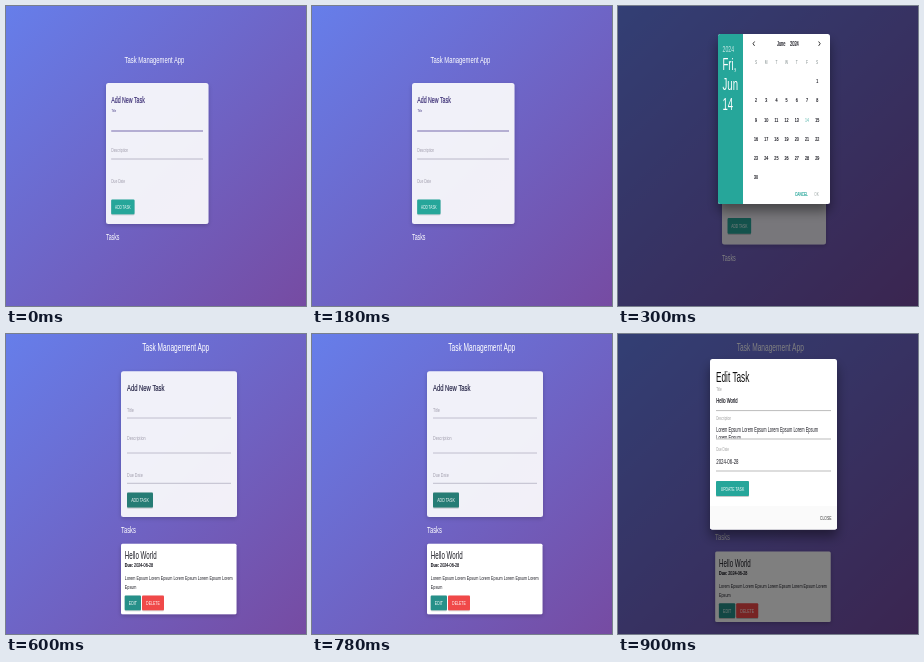
An HTML page that plays this animation: 300x300 px, repeating every 1.2 s.

```html
<!DOCTYPE html>
<html lang="en">
<head>
<meta charset="utf-8">
<title>Task Management App</title>
<style>
  html, body { margin: 0; width: 100%; height: 100%; overflow: hidden; background: #6e65c6; }
  svg { display: block; width: 100%; height: 100%; }
  text { font-family: "Liberation Sans", Arial, sans-serif; white-space: pre; }
</style>
</head>
<body>
<svg id="stage" viewBox="0 0 300 300" preserveAspectRatio="none">
  <defs>
    <linearGradient id="sky" x1="0" y1="0" x2="1" y2="1">
      <stop offset="0" stop-color="#667eea"/>
      <stop offset="1" stop-color="#764ba2"/>
    </linearGradient>
    <filter id="soft" x="-20%" y="-20%" width="140%" height="150%">
      <feDropShadow dx="0" dy="1.5" stdDeviation="2" flood-opacity=".22"/>
    </filter>
    <filter id="deep" x="-30%" y="-30%" width="160%" height="160%">
      <feDropShadow dx="0" dy="7" stdDeviation="6" flood-opacity=".42"/>
    </filter>
    <filter id="low" x="-20%" y="-20%" width="140%" height="160%">
      <feDropShadow dx="0" dy=".7" stdDeviation=".6" flood-opacity=".3"/>
    </filter>
    <clipPath id="area"><rect x="95" y="89" width="120" height="15.6"/></clipPath>
  </defs>
</svg>
<script>
const STEP = 300;
const SQUEEZE = 0.6; // every screen is shown narrower than it is tall
const TEAL = '#26a69a', GREY = '#a09dac', RULE = '#b3b0c2', INK = '#1c1c24';
const PANEL = 'rgba(255,255,255,.9)';

const text = (x, y, size, str, fill = INK, extra = '') =>
  `<text transform="translate(${x} ${y}) scale(${SQUEEZE} 1)" font-size="${size}" fill="${fill}" ${extra}>${str}</text>`;
const mid = 'text-anchor="middle"';
const bold = 'font-weight="700"';
const medium = color => `stroke="${color}" stroke-width=".2"`;

const box = (x, y, w, h, fill, filter = '', r = 2.5) =>
  `<rect x="${x}" y="${y}" width="${w}" height="${h}" rx="${r}" fill="${fill}" ${filter && `filter="url(#${filter})"`}/>`;
const rule = (x1, x2, y, color = RULE, weight = 0.8) =>
  `<path d="M${x1} ${y}H${x2}" stroke="${color}" stroke-width="${weight}"/>`;
const button = (x, y, w, h, fill, label, size) =>
  box(x, y, w, h, fill, 'low', 1) +
  text(x + w / 2, y + h / 2 + size * 0.36, size, label, '#fff', mid);

const sky = box(0, 0, 300, 300, 'url(#sky)', '', 0);
const dim = box(0, 0, 300, 300, 'rgba(0,0,0,.5)', '', 0);
const title = (x, y, size) => text(x, y, size, 'Task Management App', '#fff', mid);
const lorem = n => Array(n).fill('Lorem Epsum').join(' ');

function taskCard(x, y) {
  return `<g transform="translate(${x} ${y})">` +
    box(0, 0, 115.5, 70.5, '#fff', 'soft', 1.5) +
    text(3.8, 15, 10.3, 'Hello World') +
    text(3.8, 23.7, 6.2, '<tspan font-weight="700">Due:</tspan> 2024-06-28', INK, medium(INK)) +
    text(3.8, 36.3, 6.25, lorem(4) + ' Lorem') +
    text(3.8, 45.2, 6.25, 'Epsum') +
    button(3.7, 51.7, 16.3, 14.8, '#289089', 'EDIT', 5.9) +
    button(21, 51.7, 22, 14.8, '#f04a4a', 'DELETE', 5.9) +
    '</g>';
}

function focusedForm() {
  return sky + title(148.5, 57, 9.8) +
    box(100, 77, 102.5, 141, PANEL, 'soft') +
    text(105.2, 97, 8.8, 'Add New Task', '#3f3278', medium('#3f3278')) +
    text(105.4, 105.7, 4.4, 'Title', '#4a3f88') +
    rule(105.2, 197, 125, '#786cae', 1.2) +
    text(105.2, 146.2, 5.7, 'Description', GREY) +
    rule(105.2, 197, 153, RULE, 0.9) +
    text(105.2, 177, 5.5, 'Due Date', GREY) +
    button(105.2, 193.5, 23.3, 14.7, TEAL, 'ADD TASK', 5.3) +
    text(100, 233.5, 8.8, 'Tasks', '#fff');
}

function calendar() {
  const colX = i => 138 + i * 10.2;
  let out = box(100, 28, 112, 170, '#fff', 'deep') +
    `<path d="M125 28H102.5a2.5 2.5 0 0 0 -2.5 2.5V195.5a2.5 2.5 0 0 0 2.5 2.5H125Z" fill="${TEAL}"/>` +
    text(104.6, 45.5, 8.6, '2024', 'rgba(255,255,255,.75)');
  ['Fri,', 'Jun', '14'].forEach((s, i) => out += text(104.5, 64 + i * 20, 16, s, '#fff'));
  out += '<path d="M136.6 35.5L135 37.7L136.6 39.9M200.6 35.5L202.2 37.7L200.6 39.9" fill="none" stroke="#222" stroke-width=".9"/>' +
    text(159, 40, 6.5, 'June', INK, medium(INK)) +
    text(172, 40, 6.6, '2024', INK, medium(INK));
  [...'SMTWTFS'].forEach((d, i) => out += text(colX(i), 58.3, 5.5, d, '#7f8b8b', mid));
  for (let day = 1; day <= 30; day++) {
    const cell = day + 5; // the month opens on a Saturday
    const color = day === 14 ? '#8fcfc8' : INK;
    out += text(colX(cell % 7), 77.4 + Math.floor(cell / 7) * 19.05, 6.1, day, color,
      mid + ' ' + medium(color));
  }
  return out + text(177, 190, 5.3, 'CANCEL', TEAL, medium(TEAL)) +
    text(196.3, 190, 5.3, 'OK', '#9aa5a4');
}

function datePicker() {
  return sky +
    box(104, 92, 104, 146.5, PANEL, 'soft') +
    button(109.6, 212, 23.5, 15.7, TEAL, 'ADD TASK', 5.5) +
    text(104, 255, 9, 'Tasks', '#fff') +
    dim + calendar();
}

function taskList() {
  const field = (label, y, lineY) =>
    text(121, y, 6.2, label, GREY) + rule(121, 225, lineY);
  return sky + title(169.7, 17, 11) +
    box(115, 37.3, 116, 145.7, PANEL, 'soft') +
    text(121, 56.6, 9.8, 'Add New Task', '#29284a', medium('#29284a')) +
    field('Title', 78, 84) +
    field('Description', 105.5, 119) +
    field('Due Date', 143, 149.3) +
    button(121, 158.6, 26, 15, '#287c75', 'ADD TASK', 6) +
    text(115, 198.5, 9.7, 'Tasks', '#fff') +
    taskCard(115, 209.7);
}

function editDialog() {
  const label = (s, y) => text(98.2, y, 5, s, '#9e9e9e');
  const line = y => rule(98, 213, y, '#aaa', 0.8);
  return sky + title(152.3, 17, 11) +
    text(97, 206, 9.8, 'Tasks', '#fff') +
    taskCard(97.2, 217.5) + dim +
    box(92, 25, 127, 170.5, '#fff', 'deep') +
    '<path d="M92 172H219V193a2.5 2.5 0 0 1 -2.5 2.5H94.5a2.5 2.5 0 0 1 -2.5 -2.5Z" fill="#fafafa"/>' +
    text(98, 48, 13.8, 'Edit Task', '#111') +
    label('Title', 57) +
    text(98.2, 69.2, 6.9, 'Hello World', INK, medium(INK)) + line(76.6) +
    label('Description', 85.6) +
    text(98.2, 98, 6.6, lorem(4)) +
    `<g clip-path="url(#area)">${text(98.2, 106, 6.6, lorem(1))}</g>` + line(105) +
    label('Due Date', 116.6) +
    text(98.2, 130, 7.3, '2024-06-28', INK) + line(137) +
    button(98, 147, 33, 15, TEAL, 'UPDATE TASK', 5.8) +
    text(202, 185.6, 5.6, 'CLOSE', '#333');
}

const stage = document.getElementById('stage');
const scenes = [focusedForm, datePicker, taskList, editDialog].map(draw => {
  const g = document.createElementNS('http://www.w3.org/2000/svg', 'g');
  g.innerHTML = draw();
  stage.append(g);
  return g;
});

const start = performance.now();
function show(now) {
  const t = Math.max(0, now - start);
  const current = Math.floor(t / STEP) % scenes.length;
  scenes.forEach((g, i) => g.style.display = i === current ? '' : 'none');
  requestAnimationFrame(show);
}
show(start);
</script>
</body>
</html>
```
